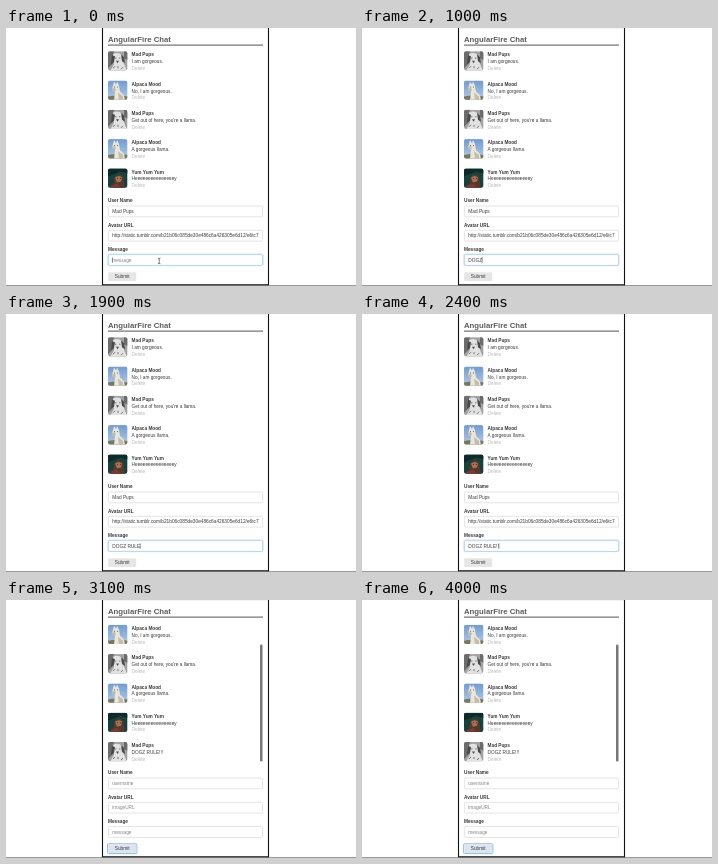
These frames come from a looping animation (350 by 258 pixels, 4100 ms). An HTML page:

```html
<!DOCTYPE html>
<html lang="en">
<head>
<meta charset="utf-8">
<title>Chat form</title>
<style>
  html, body { margin: 0; width: 100%; height: 100%; overflow: hidden; background: #fff; }
  svg { display: block; width: 100vw; height: 100vh; }
  text { font: 4.73px "Liberation Sans", Arial, sans-serif; fill: #3a3a3a; white-space: pre; }
  .bold { font-weight: 700; }
  .pale { fill: #bcbcbc; }
  .hint { fill: #858585; }
  .value { font-size: 4.78px; }
  .title { font-size: 7.75px; font-weight: 700; fill: #5c5c5c; }
  .box { fill: #fff; stroke: #d2d2d2; stroke-width: .6; }
</style>
</head>
<body>
<svg viewBox="0 0 350 258">
  <defs>
    <linearGradient id="sky" x2="0" y2="1">
      <stop stop-color="#6f9bd3"/><stop offset="1" stop-color="#b3cde6"/>
    </linearGradient>
    <clipPath id="listClip"><rect x="100" y="18" width="157" height="144"/></clipPath>
    <clipPath id="urlClip"><rect x="104" y="202" width="149.6" height="11"/></clipPath>
    <clipPath id="faceClip"><rect width="19.3" height="19.3" rx="2"/></clipPath>
    <g id="dog" clip-path="url(#faceClip)">
      <rect width="20" height="20" fill="#a2a2a2"/>
      <path d="M0 0H6L4 7 5 12 0 17ZM16 0H20V9L16 7Z" fill="#6c6c6c"/>
      <path d="M5 3Q10 0 14 4L15 10 19 20H2L6 13Z" fill="#e2e2e2"/>
      <path d="M4 4L7 5 6 11 3 13ZM13 3L16 6 17 12 14 10ZM8 9.500H11L9.500 12Z" fill="#4a4a4a"/>
      <path d="M7 7H8.500M11 7H12.500M5 17L7 15M13 18L15 16M10 15V17" stroke="#666" stroke-width=".9"/>
    </g>
    <g id="llama" clip-path="url(#faceClip)">
      <rect width="20" height="20" fill="url(#sky)"/>
      <path d="M0 16Q8 14 20 16V20H0Z" fill="#77795f"/>
      <path d="M6 20L7 11 4 9 5 5 6 1 8 4 9 1 11 5 12 11 16 15 17 20Z" fill="#ebe6da"/>
      <path d="M4 8L7 7 8 10 6 11 4 10ZM10 12L15 16 15 20H11Z" fill="#c8bca6"/>
      <path d="M6 6.500H7M9 6.500H10" stroke="#4e4740" stroke-width=".8"/>
    </g>
    <g id="night" clip-path="url(#faceClip)">
      <rect width="20" height="20" fill="#15423d"/>
      <path d="M0 0H20V5L12 3 0 8Z" fill="#0c2a2a"/>
      <path d="M5 20L6 10Q10 3 15 8L17 20Z" fill="#56392c"/>
      <path d="M7 9Q11 6 14 9L13 13 9 14Z" fill="#ab7050"/>
      <path d="M3 17L9 15 12 18 7 20H2Z" fill="#81392f"/>
      <path d="M9 10H10M12 10H13" stroke="#2a1a14" stroke-width=".8"/>
    </g>
  </defs>
  <rect width="350" height="258" fill="#fff"/>
  <path d="M0 257.500H350" stroke="#999" stroke-width="1"/>
  <rect x="96.500" y="-.500" width="166" height="257.300" fill="#fff" stroke="#111" stroke-width="1.100"/>
  <text class="title" x="102" y="13.500">AngularFire Chat</text>
  <path d="M102 17.100H257" stroke="#555" stroke-width="1"/>
  <g clip-path="url(#listClip)"><g id="list"></g></g>
  <rect id="bar" x="254" y="44.500" width="2.500" height="117" rx="1.250" fill="#777"/>
  <g id="form"></g>
  <path id="caret" stroke="#333" stroke-width=".55"/>
  <path id="beam" d="M152 230.300Q153.200 230.300 153.200 231V235Q153.200 235.700 152 235.700M154.400 230.300Q153.200 230.300 153.200 231M153.200 235Q153.200 235.700 154.400 235.700" fill="none" stroke="#222" stroke-width=".6"/>
  <rect id="ring" x="101.600" y="243.800" width="29.300" height="9.800" rx="1" fill="none" stroke="#82b1e0" stroke-width=".9"/>
  <rect id="button" x="102.200" y="244.200" width="28" height="8.800" rx="1"/>
  <text x="116.200" y="250.200" text-anchor="middle">Submit</text>
</svg>
<script>
const LOOP = 4100, BLUR = 2800, SEND = 3100, PITCH = 29.3, SCROLL = 27.7;
const MESSAGE = "DOGZ RULE!!!";
const KEY_TIMES = [500, 700, 800, 1000, 1100, 1200, 1400, 1600, 1800, 2100, 2300, 2500];
const DOG = ["dog", "Mad Pups"], LLAMA = ["llama", "Alpaca Mood"];
const CHAT = [
  [...DOG, "I am gorgeous."],
  [...LLAMA, "No, I am gorgeous."],
  [...DOG, "Get out of here, you're a llama."],
  [...LLAMA, "A gorgeous llama."],
  ["night", "Yum Yum Yum", "H" + "e".repeat(15) + "y"],
  [...DOG, MESSAGE]
];
const FIELDS = [
  ["User Name", "username", "Mad Pups"],
  ["Avatar URL", "imageURL", "http://static.tumblr.com/b21b06c085de30e486c6a426305e6d12/e6tc7"],
  ["Message", "message", ""]
];

const $ = id => document.getElementById(id);
function add(parent, tag, attrs, content = "") {
  const el = document.createElementNS("http://www.w3.org/2000/svg", tag);
  for (const key in attrs) el.setAttribute(key, attrs[key]);
  el.textContent = content;
  return parent.appendChild(el);
}
const show = (el, on) => el.setAttribute("visibility", on ? "visible" : "hidden");

const rows = CHAT.map(([face, name, line], i) => {
  const row = add($("list"), "g", { transform: `translate(102 ${23.2 + i * PITCH})` });
  add(row, "use", { href: "#" + face });
  add(row, "text", { x: 23.6, y: 5.3, class: "bold" }, name);
  add(row, "text", { x: 23.6, y: 12 }, line);
  add(row, "text", { x: 23.6, y: 18.8, class: "pale" }, "Delete");
  return row;
});

const glow = add($("form"), "rect", {
  x: 101.7, y: 225.8, width: 155.6, height: 12, rx: 2, fill: "none", stroke: "#e0eefa", "stroke-width": 1.1
});
const inputs = FIELDS.map(([label, hint, value], i) => {
  const y = 178 + i * 24.3;
  add($("form"), "text", { x: 102, y: y - 3.8, class: "bold" }, label);
  const box = add($("form"), "rect", { x: 102.4, y, width: 154.2, height: 10.8, rx: 1.3, class: "box" });
  const holder = add($("form"), "g", i === 1 ? { "clip-path": "url(#urlClip)" } : {});
  const text = add(holder, "text", { x: 106.3, y: y + 7 });
  return { box, text, hint, value };
});

function fill(input, value) {
  input.text.textContent = value || input.hint;
  input.text.setAttribute("class", value ? "value" : "hint");
}

function draw(t) {
  const sent = t >= SEND, typing = t < BLUR;
  const typed = MESSAGE.slice(0, KEY_TIMES.filter(k => t >= k).length);
  const [user, url, message] = inputs;

  $("list").setAttribute("transform", `translate(0 ${sent ? -SCROLL : 0})`);
  show(rows[5], sent);
  show($("bar"), sent);

  fill(user, sent ? "" : user.value);
  fill(url, sent ? "" : url.value);
  fill(message, sent ? "" : typed);
  show(glow, typing);
  message.box.style.stroke = typing ? "#8abbe9" : "";

  const x = 106.4 + (typed ? message.text.getComputedTextLength() : 0);
  $("caret").setAttribute("d", `M${x} 229.3V234.8`);
  show($("caret"), typing);
  show($("beam"), t < KEY_TIMES[0]);
  show($("ring"), !typing);
  $("button").setAttribute("fill", typing ? "#e6e6e6" : "#dce5ee");
}

const start = performance.now();
function tick() {
  draw((performance.now() - start) % LOOP);
  requestAnimationFrame(tick);
}
draw(0);
requestAnimationFrame(tick);
</script>
</body>
</html>
```
